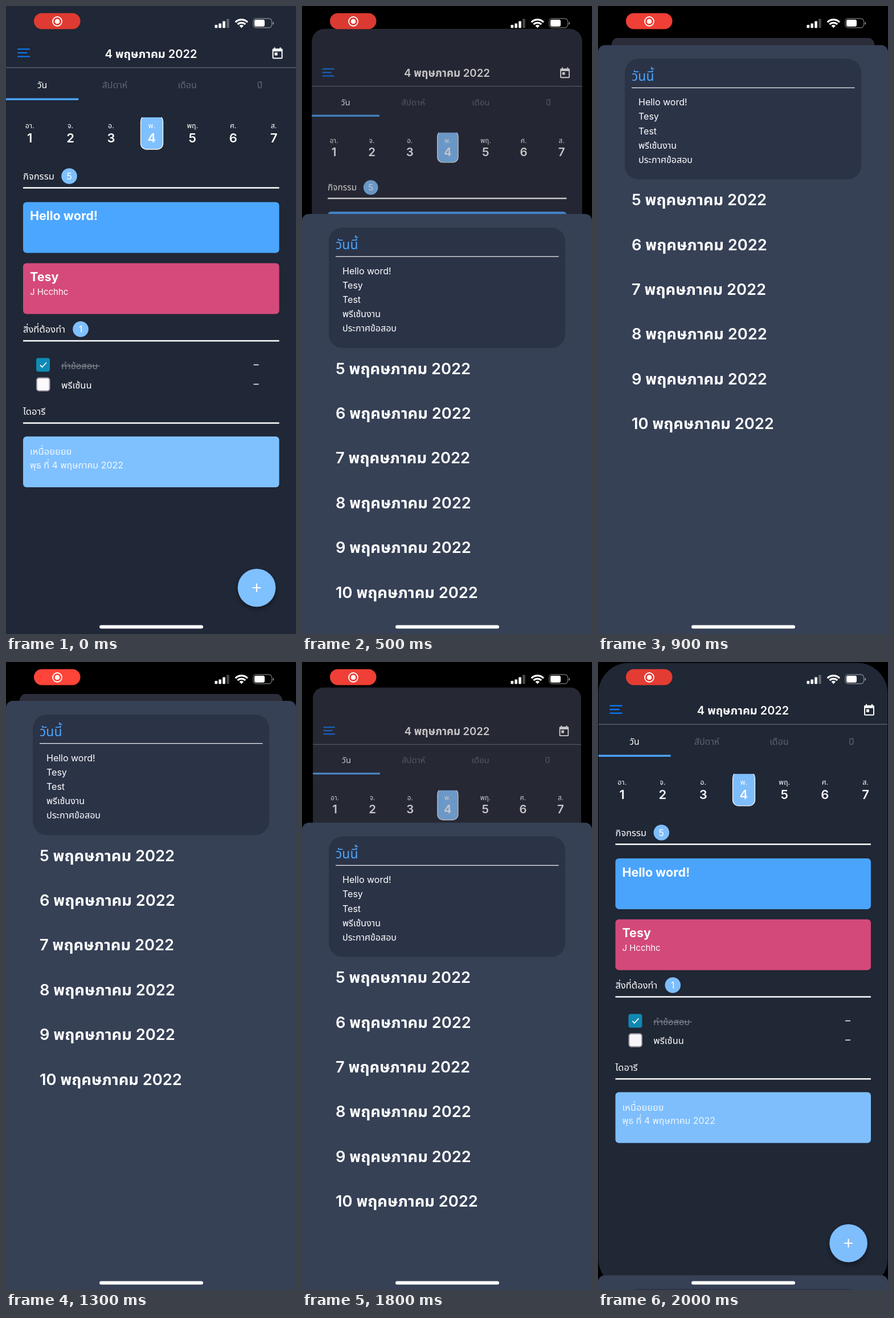
An HTML page that plays this animation: 509x1100 px, repeating every 2.1 s.

```html
<!DOCTYPE html>
<html lang="th">
<head>
<meta charset="utf-8">
<style>
  html, body { margin: 0; width: 100%; height: 100%; overflow: hidden; background: #000; }
  svg { display: block; width: 100%; height: 100%; }
  text { font: 16px Inter, "Noto Sans Thai", "Noto Sans", sans-serif; fill: #fff; }
  .mid { text-anchor: middle; }
  .faint { fill: #5f6673; }
  .line { stroke: #fff; stroke-width: 2.5; }
</style>
</head>
<body>
<svg viewBox="0 0 509 1100">
  <defs>
    <clipPath id="pageClip"><rect id="pageShape" width="509" height="1100"/></clipPath>
    <filter id="shadow" x="-30%" y="-30%" width="160%" height="160%">
      <feDropShadow dx="0" dy="4" stdDeviation="4" flood-opacity=".4"/>
    </filter>
  </defs>
  <rect width="509" height="1100"/>
  <g id="page" clip-path="url(#pageClip)">
    <rect width="509" height="1100" fill="#202736"/>
    <path d="M20 75.5h22M20 82h17M20 88.5h22" stroke="#0a7cff" stroke-width="2.2"/>
    <path transform="translate(464.5 71.5)" fill="#fff" d="M19 3h-1V1h-2v2H8V1H6v2H5c-1.1 0-2 .9-2 2v14c0 1.1.9 2 2 2h14c1.1 0 2-.9 2-2V5c0-1.100-.9-2-2-2zm0 16H5V8h14v11zM7 10h5v5H7z"/>
    <rect y="107.500" width="509" height="1" fill="#717a88"/>
    <rect y="161.500" width="127.300" height="3.500" fill="#4ba3f5"/>
    <path d="M239 195Q236.500 198 236.500 203V241a10 10 0 0 0 10 10h19a10 10 0 0 0 10-10V203Q275.500 198 273 195" fill="#7fc0ff" stroke="#fff" stroke-width="1.300"/>
    <g id="pageContent"></g>
    <g fill="none" stroke-width="2">
      <rect x="53" y="616.500" width="24" height="24" rx="4" fill="#0f8bb5"/>
      <path d="M60 629l3.500 3.500 7.500-8" stroke="#fff" stroke-width="1.800"/>
      <rect x="54" y="651.500" width="22.500" height="22.500" rx="4" fill="#fbf9fc" stroke="#a19ca8"/>
      <path d="M97 630.500h67.500" stroke="#7c818c" stroke-width="1.300"/>
      <path d="M434.500 628.500h9M434.500 662.500h9" stroke="#fff" stroke-width="1.500"/>
    </g>
    <circle cx="440" cy="1019" r="33.300" fill="#7fc0ff" filter="url(#shadow)"/>
    <path d="M432.500 1019h15M440 1011.500v15" stroke="#fff" stroke-width="2.200"/>
    <rect id="dim" width="509" height="1100"/>
  </g>
  <g id="sheet">
    <path id="sheetShape" fill="#364156"/>
    <rect id="panel" x="47" y="24" width="415" rx="24" fill="#2b3347"/>
    <rect x="59" y="74" width="391.500" height="1.300" fill="#e8eaee"/>
    <g id="sheetTitle"></g>
    <g id="sheetContent"></g>
  </g>
  <rect id="record" x="49" y="12.500" width="81.500" height="28" rx="14"/>
  <circle cx="90" cy="27" r="8" fill="none" stroke="#fff" stroke-width="1.800"/>
  <circle cx="90" cy="27" r="4.300" fill="#fff"/>
  <g fill="#fff">
    <rect x="366.500" y="33" width="4.700" height="5.500" rx="1.200"/>
    <rect x="373.300" y="30.500" width="4.700" height="8" rx="1.200"/>
    <rect x="380.200" y="26.500" width="4.700" height="12" rx="1.200"/>
    <rect x="387.100" y="22.500" width="4.700" height="16" rx="1.200" opacity=".28"/>
    <path d="M413.300 38.500l-3.800-4a5.500 5.500 0 0 1 7.600 0z"/>
    <path d="M402.700 28.300a14.800 14.800 0 0 1 21.200 0M406.500 32.200a9.600 9.600 0 0 1 13.600 0" fill="none" stroke="#fff" stroke-width="3.200"/>
    <rect x="434" y="22" width="32.500" height="16" rx="5" fill="none" stroke="#fff" stroke-width="1.300" opacity=".42"/>
    <path d="M468 27.500q2.500 1 2.500 2.700t-2.500 2.700z" opacity=".45"/>
    <rect x="436" y="24" width="18" height="12" rx="3"/>
    <rect x="164" y="1084.500" width="182" height="6" rx="3"/>
  </g>
</svg>
<script>
const $ = id => document.getElementById(id);
const text = (x, y, str, size = 16, weight = 400, attrs = "") =>
  `<text x="${x}" y="${y}" style="font-size:${size}px;font-weight:${weight}" ${attrs}>${str}</text>`;
const centered = 'class="mid"';
const section = (y, title, badgeX, count) =>
  text(30, y, title, 16.5) +
  `<path class="line" d="M30 ${y + 14.5}h449.500"/>` +
  (count ? `<circle cx="${badgeX}" cy="${y - 6}" r="13.800" fill="#7fc0ff"/>` + text(badgeX, y, count, 16, 400, centered) : "");
const card = (y, color) =>
  `<rect x="30" y="${y}" width="449.500" height="89" rx="6" fill="${color}"/>`;

const tabs = ["วัน", "สัปดาห์", "เดือน", "ปี"];
const days = ["อา.", "จ.", "อ.", "พ.", "พฤ.", "ศ.", "ส."];
const events = ["Hello word!", "Tesy", "Test", "พรีเซ้นงาน", "ประกาศข้อสอบ"];

$("pageContent").innerHTML =
  text(254.5, 90.5, "4 พฤษภาคม 2022", 20, 600, centered) +
  tabs.map((name, i) => text(63.6 + i * 127.25, 143.5, name, 16, 400, `class="mid ${i ? "faint" : ""}"`)).join("") +
  days.map((name, i) => {
    const x = 41.7 + i * 71.4;
    return text(x, 214, name, 12.5, 400, centered) + text(x, 239, i + 1, 22, 600, centered);
  }).join("") +
  section(304, "กิจกรรม", 111, 5) +
  card(343.5, "#4ba6ff") + text(42, 375, "Hello word!", 21.5, 700) +
  card(450.5, "#d54a7a") + text(42, 482, "Tesy", 21.5, 700) + text(42, 505.5, "J Hcchhc", 15) +
  section(572, "สิ่งที่ต้องทำ", 131, 1) +
  text(97, 636, "ทำข้อสอบ", 16.5, 400, 'style="" fill-opacity=".42"') +
  text(97, 669.5, "พรีเซ้นน", 16.5) +
  section(716, "ไดอารี") +
  card(754, "#7fc0ff") +
  text(42, 786, "เหนื่อยยยย", 16.5, 400, 'fill-opacity=".9"') +
  text(42, 810, "พุธ ที่ 4 พฤษภาคม 2022", 16, 400, 'fill-opacity=".9"');

$("sheetTitle").innerHTML = `<g>${text(59, 62, "วันนี้", 23, 500)}</g>`;
$("sheetTitle").querySelector("text").style.fill = "#4ba6ff";
$("sheetContent").innerHTML =
  events.map((name, i) => text(71, 105.5 + i * 25.2, name, 16)).join("") +
  Array.from({ length: 6 }, (_, i) => text(59, 280.5 + i * 78.4, `${i + 5} พฤคษภาคม 2022`, 27.3, 600)).join("");

const LOOP = 2100, STEP = 100;
const OPEN = 363, DRAG = 1560, RELEASE = 1800;
const OMEGA = 18.26; // critically damped spring, 1/s

// 0 = sheet hidden, 1 = sheet fully open
function openness(t) {
  if (t < OPEN) return 0;
  if (t < DRAG) {
    const x = OMEGA * (t - OPEN) / 1000;
    return 1 - (1 + x) * Math.exp(-x);
  }
  if (t <= RELEASE) return 1 - 0.207 * ((t - DRAG) / (RELEASE - DRAG)) ** 2;
  const s = (t - RELEASE) / 1000;
  return (0.793 + 0.84 * s) * Math.exp(-OMEGA * s);
}

function draw(t) {
  const p = openness(t);
  const scale = 1 - 0.0945 * p;
  $("page").setAttribute("transform", `translate(${254.5 * (1 - scale)} ${56 * p}) scale(${scale})`);
  $("pageShape").setAttribute("rx", p < 0.002 ? 0 : 55 - 43 * p);

  const lift = p ** 1.3;
  $("dim").setAttribute("fill", `rgb(${75 * lift} ${63 * lift} ${68 * lift})`);
  $("dim").setAttribute("opacity", 0.27 * Math.min(1, Math.max(0, (p - 0.02) / 0.12)));

  const corner = p > 0.998 ? 0 : 63;
  $("sheet").setAttribute("transform", `translate(0 ${1100 - 1032 * p})`);
  $("sheetShape").setAttribute("d",
    `M0 12a12 12 0 0 1 12-12H497a12 12 0 0 1 12 12V${1032 - corner}a${corner} ${corner} 0 0 1 ${-corner} ${corner}` +
    `H${corner}a${corner} ${corner} 0 0 1 ${-corner} ${-corner}z`);

  // The event list arrives shortly after the sheet appears.
  const loaded = t >= 500;
  $("panel").setAttribute("height", loaded ? 211 : 118);
  $("sheetContent").setAttribute("visibility", loaded ? "visible" : "hidden");

  const red = 235 + 20 * Math.cos(2 * Math.PI * (t - 1350) / LOOP);
  $("record").setAttribute("fill", `rgb(${red} ${red * 0.265} ${red * 0.225})`);
}

const start = performance.now();
function tick() {
  const t = (performance.now() - start) % LOOP;
  draw(Math.floor(t / STEP) * STEP);
  requestAnimationFrame(tick);
}
tick();
</script>
</body>
</html>
```
